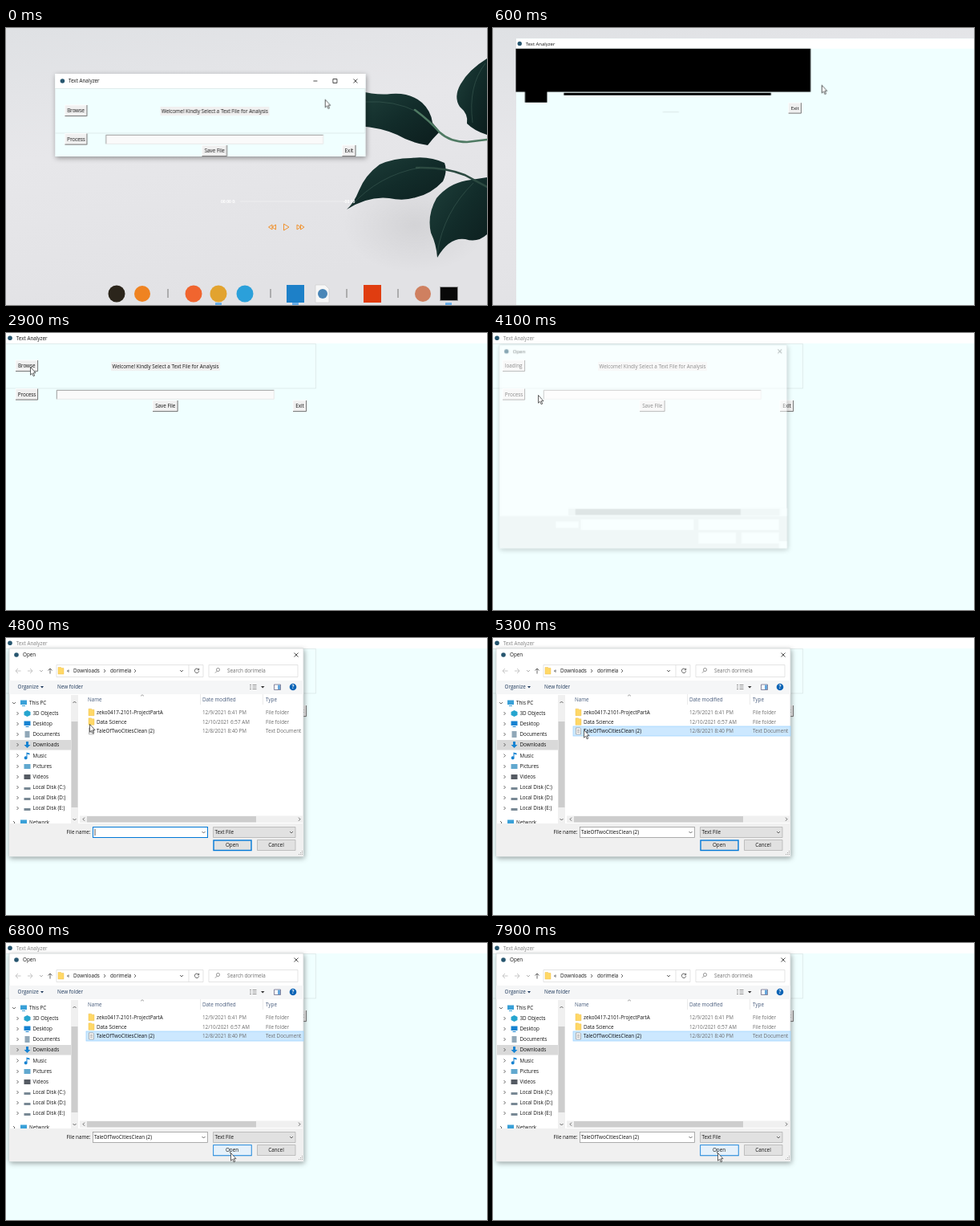
These frames come from a looping animation (600x345 px, 8000 ms). An HTML page:

```html
<!DOCTYPE html>
<html lang="en">
<head>
<meta charset="utf-8">
<title>Text Analyzer</title>
<style>
html, body { margin: 0; width: 100%; height: 100%; overflow: hidden; background: #e4e5e8; }
svg { display: block; width: 600px; height: 345px; }
text { font-family: "Open Sans", "Noto Sans", sans-serif; font-size: 6.3px; fill: #111; white-space: pre; }
.mid { text-anchor: middle; }
.soft { fill: #6d6d6d; }
.line { fill: none; stroke: #444; stroke-width: .8; }
.step { animation: 8s step-end infinite; }

/* Desktop window and its maximising */
#win { animation-name: maximise; }
.small { animation-name: small; }
.large { animation-name: large; }
.unpainted { animation-name: unpainted; }
.painted { animation-name: painted; }
.browse { animation-name: browse; }
.loading { animation-name: loading; }
.title { animation-name: title; }
@keyframes maximise {
  0% { transform: translate(61.4px, 62px); }
  6.2% { transform: translate(45px, 26px) scale(.91); }
  7.4% { transform: translate(28.5px, 13.4px) scale(.95); }
  8.7% { transform: translate(13px, 6px) scale(.98); }
  11.2%, 100% { transform: none; }
}
@keyframes small { 0% { opacity: 1; } 6.2%, 100% { opacity: 0; } }
@keyframes large { 0% { opacity: 0; } 6.2%, 100% { opacity: 1; } }
@keyframes unpainted { 0% { opacity: 0; } 6.2% { opacity: 1; } 8.7%, 100% { opacity: 0; } }
@keyframes painted { 0% { opacity: 1; } 6.2% { opacity: 0; } 8.7%, 100% { opacity: 1; } }
@keyframes browse { 0% { opacity: 1; } 39.9%, 100% { opacity: 0; } }
@keyframes loading { 0% { opacity: 0; } 39.9%, 100% { opacity: 1; } }
@keyframes title { 0% { fill: #111; } 41.2%, 100% { fill: #808080; } }

/* File dialog */
#dialog { animation-name: appear; }
.blank { animation-name: blank; }
.body { animation-name: body; }
.chosen { animation-name: chosen; }
.unchosen { animation-name: unchosen; }
.hover { animation-name: hover; }
@keyframes appear {
  0% { opacity: 0; }
  51.2% { opacity: .52; transform: translate(4.1px, 2.3px) scale(.977); }
  52.4%, 100% { opacity: 1; transform: none; }
}
@keyframes blank { 0% { opacity: 1; } 53.7%, 100% { opacity: 0; } }
@keyframes body { 0% { opacity: 0; } 53.7%, 100% { opacity: 1; } }
@keyframes chosen { 0% { opacity: 0; } 66.2%, 100% { opacity: 1; } }
@keyframes unchosen { 0% { opacity: 1; } 66.2%, 100% { opacity: 0; } }
@keyframes hover { 0% { opacity: 0; } 81.2%, 100% { opacity: 1; } }

#pointer { animation: pointer 8s linear infinite; }
@keyframes pointer {
  0% { transform: translate(397.7px, 88.7px); }
  1.2% { transform: translate(399px, 87px); }
  4.5%, 11% { transform: translate(409.7px, 70.7px); }
  15% { transform: translate(290px, 98px); }
  18.75% { transform: translate(160px, 113px); }
  21.2% { transform: translate(95px, 58px); }
  24% { transform: translate(55px, 48px); }
  31%, 43.7% { transform: translate(30px, 42px); }
  48.7% { transform: translate(44px, 66px); }
  51.2%, 53% { transform: translate(56px, 77px); }
  59%, 62.5% { transform: translate(104px, 107px); }
  65%, 68% { transform: translate(113px, 114px); }
  71% { transform: translate(190px, 160px); }
  75% { transform: translate(273px, 210px); }
  79% { transform: translate(279px, 246px); }
  84%, 100% { transform: translate(280px, 261px); }
}
</style>
</head>
<body>
<svg viewBox="0 0 600 345">
  <defs>
    <linearGradient id="wall" x2=".3" y2="1">
      <stop stop-color="#dfe1e4"/><stop offset=".45" stop-color="#e7e7ea"/><stop offset="1" stop-color="#e2e2e5"/>
    </linearGradient>
    <radialGradient id="shade">
      <stop stop-opacity=".07"/><stop offset="1" stop-opacity="0"/>
    </radialGradient>
    <linearGradient id="leaf" x2="1" y2="1">
      <stop stop-color="#1f403b"/><stop offset=".5" stop-color="#122c2a"/><stop offset="1" stop-color="#0c1d1d"/>
    </linearGradient>
    <filter id="shadow" x="-10%" y="-10%" width="120%" height="125%">
      <feDropShadow dx="1" dy="2" stdDeviation="3" flood-opacity=".38"/>
    </filter>
    <clipPath id="treeClip"><rect x="4" y="71" width="87" height="160"/></clipPath>
    <path id="down" class="line" d="M-2-1 0 1 2-1"/>
    <path id="right" class="line" d="M-1-2 1 0-1 2"/>
    <path id="folder" fill="#ffd867" stroke="#e9b93f" stroke-width=".4" d="M-3.5-4.5H0L1-3.5H3.5V4H-3.5Z"/>
    <path id="sheet" fill="#fafafa" stroke="#888" stroke-width=".6" d="M-3-4H2L3-3V4H-3ZM-1.7-1.5H1.7M-1.7 0H1.7M-1.7 1.5H1.7"/>
  </defs>

  <g id="desktop">
    <rect width="600" height="345" fill="url(#wall)"/>
    <ellipse cx="510" cy="245" rx="90" ry="60" fill="url(#shade)"/>
    <g fill="url(#leaf)">
      <path d="M440 78Q462 84 480 82 504 80 519 93 530 103 532 118L541 129Q532 138 526 146 505 143 488 133 468 124 440 122Z"/>
      <path d="M600 38Q577 52 567 70 558 86 566 98 577 107 575 119 584 128 600 133Z"/>
      <path d="M425 226Q434 218 440 203 448 183 466 170 484 162 505 162 528 159 547 168 551 178 545 191 530 207 511 211 496 216 478 212 452 209 425 226Z"/>
      <path d="M538 286Q537 270 530 255 525 233 537 212 552 194 574 190L600 186V257Q588 268 573 263 553 260 538 286Z"/>
    </g>
    <g fill="none" stroke="#4f7a63" stroke-width="2.500" stroke-linecap="round">
      <path d="M510 102Q529 116 541 130 554 142 575 142L600 139"/>
      <path d="M512 174Q548 173 572 183L600 198" stroke="#2c4a41"/>
    </g>
    <path d="M448 92Q485 90 512 104M430 222Q465 183 516 174M538 280Q546 229 583 193M598 44Q576 72 582 118" fill="none" stroke="#46675e" stroke-width=".8" opacity=".6"/>
    <path d="M292 216H421" stroke="#fff" opacity=".35"/>
    <g font-weight="bold">
      <text x="268" y="218" style="font-size:5px;fill:#fff">00:00 0:</text>
      <text x="421" y="218" style="font-size:5px;fill:#fff">-00:00</text>
    </g>
    <path fill="none" stroke="#f0922e" d="M332 245V251L327.500 248ZM336.500 245V251L332 248ZM346.500 244V252L353 248ZM363 245V251L367.500 248ZM367.500 245V251L372 248Z"/>
    <g id="dock"></g>
  </g>

  <g id="win" class="step">
    <g class="step small">
      <rect y="-5" width="387" height="103" fill="#f0ffff" filter="url(#shadow)"/>
      <rect y="-5" width="387" height="18" fill="#fff"/>
      <circle cx="9" cy="4" r="2.800" fill="#27566f"/>
      <text x="16.500" y="6">Text Analyzer</text>
      <path class="line" style="stroke:#222" d="M322 4H327M346.500 1.500H351.500V6.500H346.500ZM372 1.500 377 6.500M377 1.500 372 6.500"/>
    </g>
    <g class="step large">
      <rect width="700" height="420" fill="#f0ffff"/>
      <rect width="700" height="13" fill="#fff"/>
      <circle cx="5" cy="6.300" r="2.800" fill="#27566f"/>
      <text class="step title" x="12.800" y="8.700">Text Analyzer</text>
    </g>
    <path d="M0 13.500H386.500V69H0" fill="none" stroke="#d9e4e4" stroke-width=".7"/>
    <g class="step painted">
      <g id="buttons"></g>
      <rect x="131" y="36" width="136" height="11" fill="#f0f0f0"/>
      <text class="mid" x="199" y="43.500">Welcome! Kindly Select a Text File for Analysis</text>
      <rect x="63" y="71" width="271.500" height="11.500" fill="#fafafa"/>
      <path d="M63.300 82.500V71.300H334.500" fill="none" stroke="#868686" stroke-width=".8"/>
      <path d="M63 82.300H334.300V71" fill="none" stroke="#e3e3e3" stroke-width=".7"/>
    </g>
    <g class="step unpainted">
      <path d="M0 13H387V69.500H41V83.500H12V69.500H0ZM63 71H335V74H63Z"/>
      <path d="M193 96H214" stroke="#ccd5d5" stroke-width=".7"/>
    </g>
    <g id="exit"></g>
  </g>

  <g id="dialog" class="step">
    <rect x="4" y="13" width="367" height="259" fill="#fff" stroke="#b5babd" stroke-width=".5" filter="url(#shadow)"/>
    <rect x="4" y="231" width="367" height="41" fill="#f0f0f0"/>
    <circle cx="13" cy="21" r="2.800" fill="#27566f"/>
    <text x="21" y="23.300">Open</text>
    <path class="line" style="stroke:#222" d="M359.500 18.500 364.500 23.500M364.500 18.500 359.500 23.500"/>
    <rect x="92" y="221.500" width="279" height="8.500" fill="#f0f0f0"/>
    <rect x="101" y="222" width="211" height="7.500" fill="#cdcdcd"/>
    <g class="step blank">
      <path fill="#fff" d="M76 238H105V246H76ZM108 235H252V249H108ZM258 235H361V249H258ZM258 252H306V266H258ZM313 252H361V266H313ZM362 221H371V231H362ZM361 263H371V272H361Z"/>
    </g>

    <g class="step body">
      <path class="line" style="stroke:#b9b9b9" d="M18.500 41H12M15 38 12 41 15 44M27 41H33M30 38 33 41 30 44"/>
      <use href="#down" x="44" y="41" opacity=".5"/>
      <path class="line" d="M55 44.500V38M52.500 40.500 55 38 57.500 40.500"/>
      <path fill="#fff" stroke="#d9d9d9" stroke-width=".7" d="M63 33.500H246V48.500H63ZM228 33.500V48.500M253 33.500H364V48.500H253Z"/>
      <use href="#folder" x="68.500" y="41"/>
      <text x="76" y="43">«</text>
      <text x="84" y="43.300">Downloads</text>
      <use href="#right" x="123" y="41"/>
      <text x="130" y="43.300">dorimela</text>
      <use href="#right" x="161" y="41"/>
      <use href="#down" x="219" y="41"/>
      <path class="line" d="M240.300 39.300A2.700 2.700 0 1 0 240.700 41.300M240.700 37.800V39.800H238.700"/>
      <path class="line" style="stroke:#777" d="M266.500 39.500A2 2 0 1 1 262.500 39.500 2 2 0 1 1 266.500 39.500M263 41.300 261 43.500"/>
      <text class="soft" x="276" y="43.300">Search dorimela</text>

      <rect x="4" y="53" width="367" height="17" fill="#f5f6f7"/>
      <text x="14.500" y="63.300" style="fill:#1e395b">Organize</text>
      <path fill="#1e395b" d="M43 60H47L45 62.500Z"/>
      <text x="64" y="63.300" style="fill:#1e395b">New folder</text>
      <path class="line" style="stroke:#777" d="M304 58.500H306M307.500 58.500H312.500M304 61H306M307.500 61H312.500M304 63.500H306M307.500 63.500H312.500"/>
      <path fill="#333" d="M318 60H322.500L320.200 62.500Z"/>
      <path fill="#fff" stroke="#557" stroke-width=".7" d="M334.500 58H342.500V64.500H334.500Z"/>
      <path fill="#66a6dc" d="M339 58.500H342V64H339Z"/>
      <circle cx="358" cy="61" r="4.300" fill="#0b63b5"/>
      <text class="mid" x="358" y="63.300" style="fill:#fff;font-weight:bold">?</text>

      <g id="tree" clip-path="url(#treeClip)"></g>
      <rect x="81" y="71" width="9" height="160" fill="#f0f0f0"/>
      <rect x="81.500" y="104" width="8" height="107" fill="#cdcdcd"/>
      <use href="#down" x="85.500" y="226"/>
      <use href="#down" transform="translate(85.500 80) scale(1 -1)"/>
      <path stroke="#e3e3e3" stroke-width=".7" d="M242.500 70V83M320.500 70V83"/>
      <use href="#down" transform="translate(170 71.500) scale(1 -.8)" opacity=".7"/>
      <g style="fill:#44597a">
        <text x="102" y="79.300" style="fill:inherit">Name</text>
        <text x="245" y="79.300" style="fill:inherit">Date modified</text>
        <text x="324" y="79.300" style="fill:inherit">Type</text>
      </g>
      <rect class="step chosen" x="100" y="110" width="271" height="12" fill="#cce8ff" stroke="#99d1ff" stroke-width=".7"/>
      <g id="files"></g>
      <use href="#right" transform="translate(97 225.700) scale(-1 1)"/>
      <use href="#right" x="366" y="225.700"/>

      <text x="105.500" y="244" text-anchor="end">File name:</text>
      <rect x="108.500" y="235.500" width="143" height="13" fill="#fff" stroke="#8c8c8c" stroke-width=".7"/>
      <g class="step unchosen">
        <rect x="108.500" y="235.500" width="143" height="13" fill="none" stroke="#0078d7"/>
        <path d="M111 238V246" stroke="#111" stroke-width=".7"/>
      </g>
      <text class="step chosen" x="110" y="244">TaleOfTwoCitiesClean (2)</text>
      <use href="#down" x="246.500" y="242"/>
      <path fill="#e1e1e1" stroke="#adadad" stroke-width=".7" d="M258.500 235.500H361V248.500H258.500ZM313.500 251.500H361V264.500H313.500Z"/>
      <text x="260.500" y="244">Text File</text>
      <use href="#down" x="356" y="242"/>
      <rect x="259" y="252" width="47" height="12.500" fill="#e1e1e1" stroke="#0078d7" stroke-width="1.400"/>
      <g class="step hover">
        <rect x="258.300" y="251.300" width="48.400" height="13.900" fill="#f0f0f0"/>
        <rect x="258.700" y="251.700" width="47.500" height="13" fill="#e5f1fb" stroke="#0078d7" stroke-width=".8"/>
      </g>
      <text class="mid" x="282" y="260.300">Open</text>
      <text class="mid" x="337" y="260.300">Cancel</text>
      <path stroke="#a8a8a8" stroke-dasharray="1 1" d="M369.500 265V271M367.500 267V271M365.500 269V271"/>
    </g>
  </g>

  <path id="pointer" fill="#fff" stroke="#222" stroke-width=".7" stroke-linejoin="round" d="M.5.500V10.200L2.700 8.200 4.200 11.800 5.700 11.100 4.200 7.700H7Z"/>
</svg>

<script>
const fill = (id, parts) => { document.getElementById(id).innerHTML = parts.join(""); };
const label = (x, y, words, cls = "") => `<text class="${cls}" x="${x}" y="${y}">${words}</text>`;

// Raised button: light top and left edges, dark bottom and right edges
const button = (x, y, w, words = "") => `
  <rect x="${x}" y="${y}" width="${w}" height="14" fill="#f0f0f0"/>
  <path d="M${x} ${y + 14}V${y}H${x + w}" fill="none" stroke="#fff" stroke-width=".8"/>
  <path d="M${x} ${y + 13.6}H${x + w - .4}V${y}" fill="none" stroke="#666" stroke-width=".9"/>
  ${label(x + w / 2, y + 9.2, words, "mid")}`;

fill("buttons", [
  button(12, 34, 28),
  label(25.7, 43.2, "Browse", "mid step browse"),
  label(25.7, 43.2, "loading", "mid step loading"),
  button(12, 69.5, 28, "Process"),
  button(183, 84, 31.5, "Save File")
]);
fill("exit", [button(358, 84, 17, "Exit")]);

const disc = (x, color, r = 10.5) => `<circle cx="${x}" cy="331" r="${r}" fill="${color}"/>`;
const square = (x, color, s = 22) => `<rect x="${x - s / 2}" y="${331 - s / 2}" width="${s}" height="${s}" fill="${color}"/>`;
fill("dock", [
  disc(138, "#2b251b"), disc(170, "#ef8321", 10), disc(234, "#f0652f"), disc(265, "#e2a32f"),
  disc(298, "#2ba0da"), square(361, "#1d80c8"),
  `<path d="M386 320H398L403 325V342H386Z" fill="#f7f7f7" stroke="#ccc" stroke-width=".6"/>`, disc(395, "#4a86b7", 6),
  square(457, "#e03d10"), disc(520, "#cf8060", 10),
  `<path d="M541.500 322.500H563.500V339.500H541.500Z" fill="#080808" stroke="#999"/>`,
  ...[202, 330, 425, 489].map(x => `<path d="M${x} 325V336" stroke="#777"/>`),
  ...[265, 361, 552].map(x => `<rect x="${x - 4}" y="342" width="8" height="3" fill="#6aaee8"/>`)
]);

const screen = "M-4-3.500H4V2H-4ZM-2 3H2V4H-2Z";
const box = "M0-4 4-2V2L0 4-4 2V-2Z";
const page = "M-3-4H3V4H-3Z";
const arrow = "M-1.500-4H1.500V0H4L0 4-4 0H-1.500Z";
const note = "M-1-4 3-3V-1L0-2V2A2 2 0 1 1-1 1Z";
const photo = "M-4-3H4V3H-4Z";
const disk = "M-4 0H4V3H-4Z";
const tree = [
  ["This PC", 81, screen, "#39a0d8"], ["3D Objects", 94, box, "#26a5cf"],
  ["Desktop", 107, screen, "#1683d2"], ["Documents", 120, page, "#91a8b8"],
  ["Downloads", 133, arrow, "#1683d2"], ["Music", 146.5, note, "#1683d2"],
  ["Pictures", 160, photo, "#61a8cf"], ["Videos", 173, photo, "#555b63"],
  ["Local Disk (C:)", 186, disk, "#788894"], ["Local Disk (D:)", 199, disk, "#788894"],
  ["Local Disk (E:)", 212, disk, "#788894"], ["Network", 230, screen, "#39a0d8"]
];
fill("tree", [
  `<rect x="5" y="127" width="76" height="12.500" fill="#d9d9d9"/>`,
  ...tree.map(([name, y, shape, color]) => {
    const indent = name === "This PC" || name === "Network" ? 0 : 4.5;
    const mark = name === "This PC" ? "down" : "right";
    return `<use href="#${mark}" x="${10 + indent}" y="${y}"/>
      <path transform="translate(${22 + indent} ${y})" d="${shape}" fill="${color}"/>
      ${label(29 + indent, y + 2.3, name)}`;
  })
]);

const files = [
  ["zeko0417-2101-ProjectPartA", "12/9/2021 6:41 PM", "File folder", "folder"],
  ["Data Science", "12/10/2021 6:57 AM", "File folder", "folder"],
  ["TaleOfTwoCitiesClean (2)", "12/8/2021 8:40 PM", "Text Document", "sheet"]
];
fill("files", files.map(([name, date, type, icon], i) => {
  const y = 92.7 + i * 11.6;
  return `<use href="#${icon}" x="106.500" y="${y}"/>` + label(113, y + 2.2, name) +
    label(245, y + 2.2, date, "soft") + label(324, y + 2.2, type, "soft");
}));
</script>
</body>
</html>
```
